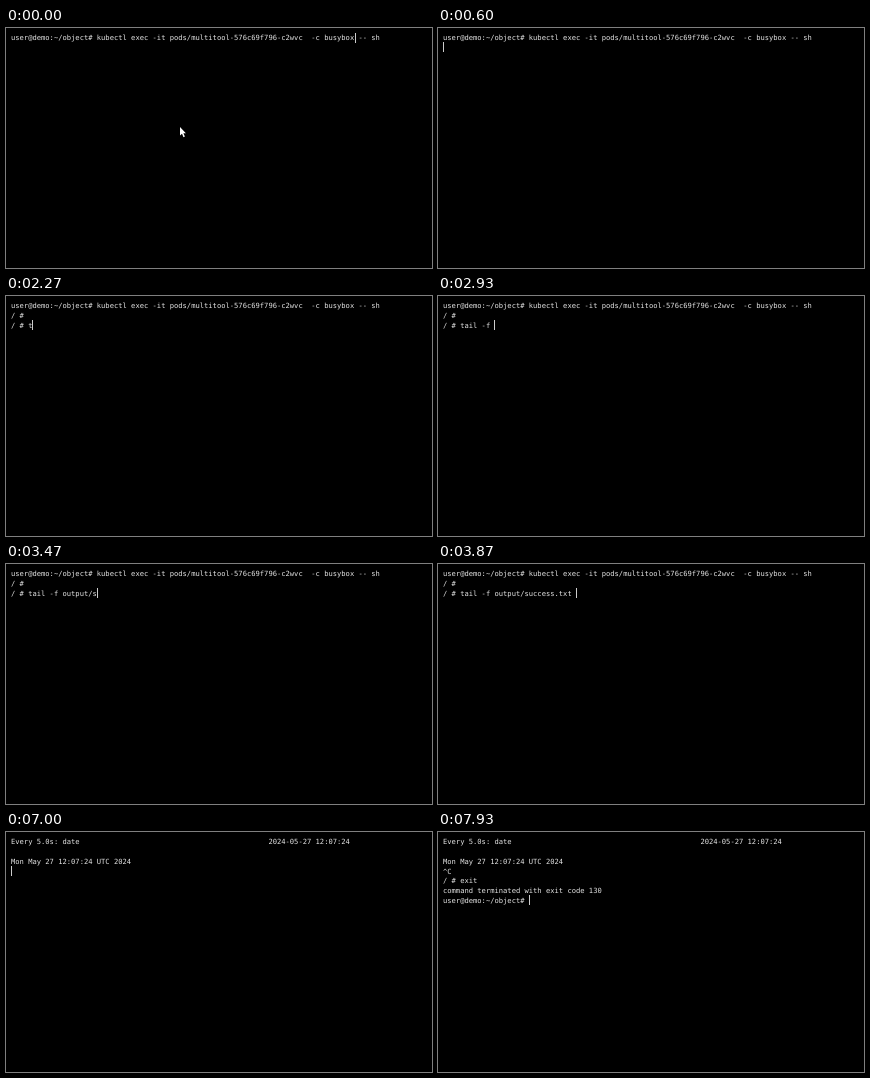
Write an HTML page with a canvas that moves like this. It is 426 by 240 pixels and loops after 8 s.

```html
<!DOCTYPE html>
<html lang="en">
<head>
<meta charset="utf-8">
<title>Terminal session</title>
<style>
  html, body { margin: 0; width: 100%; height: 100%; overflow: hidden; background: #000; }
  canvas { display: block; }
</style>
</head>
<body>
<canvas id="stage" width="426" height="240"></canvas>
<script>
const ctx = document.getElementById("stage").getContext("2d");
const LOOP = 8000;
const LEFT = 5, TOP = 5, COLUMN = 4.3, LINE = 9.8, BASELINE = 7.2;
const PROMPT = "user@demo:~/object# ";
const LOGIN = PROMPT + "kubectl exec -it pods/multitool-576c69f796-c2wvc  -c busybox -- sh";

// Part of a text typed so far
const typed = (text, t, start, perKey) =>
  text.slice(0, Math.max(0, Math.floor((t - start) / perKey) + 1));

function tailCommand(t) {
  let command = typed("tail -f ", t, 2270, 67);
  command += t < 3330 ? typed("out", t, 3070, 67) : "output/";
  if (t < 3330) return command;
  return command + (t < 3730 ? typed("suc", t, 3470, 67) : "success.txt ");
}

function watchScreen(t) {
  const time = "12:07:" + (t < 5670 ? 14 : t < 7000 ? 19 : 24);
  return [
    "Every 5.0s: date".padEnd(60) + "2024-05-27 " + time,
    "",
    `Mon May 27 ${time} UTC 2024`
  ];
}

// Lines on screen; the cursor follows the last line unless a column is given
function screen(t) {
  if (t < 470) return { lines: [LOGIN], column: 80 };
  if (t < 870) return { lines: [LOGIN, ""] };
  if (t < 1200) return { lines: [LOGIN, "/ # "] };
  if (t < 4070) return { lines: [LOGIN, "/ # ", "/ # " + tailCommand(t)] };
  const lines = watchScreen(t);
  if (t < 7470) return { lines: [...lines, ""] };
  lines.push("^C", "/ # " + typed("exit", t, 7600, 60));
  if (t >= 7860) lines.push("command terminated with exit code 130", PROMPT);
  return { lines };
}

function drawPointer(x, y) {
  ctx.fillStyle = "#fff";
  ctx.fill(new Path2D(`M${x} ${y}v8.6l2-1.8 1.5 3.4 1.4-.6-1.5-3.4h2.5z`));
}

function draw(now) {
  const t = now % LOOP;
  const { lines, column = lines.at(-1).length } = screen(t);
  ctx.fillStyle = "#000";
  ctx.fillRect(0, 0, 426, 240);

  ctx.font = '7.143px "DejaVu Sans Mono", monospace';
  ctx.textRendering = "geometricPrecision";
  ctx.fillStyle = "#e4e4e4";
  lines.forEach((line, row) => ctx.fillText(line, LEFT, TOP + row * LINE + BASELINE));

  const cursorX = Math.floor(LEFT + column * COLUMN + 0.01);
  const cursorY = Math.floor(TOP + (lines.length - 1) * LINE);
  ctx.fillStyle = "#ccc";
  ctx.fillRect(cursorX, cursorY, 1, 10);

  if (t < 470) drawPointer(174, 99);
  requestAnimationFrame(draw);
}
requestAnimationFrame(draw);
</script>
</body>
</html>
```
